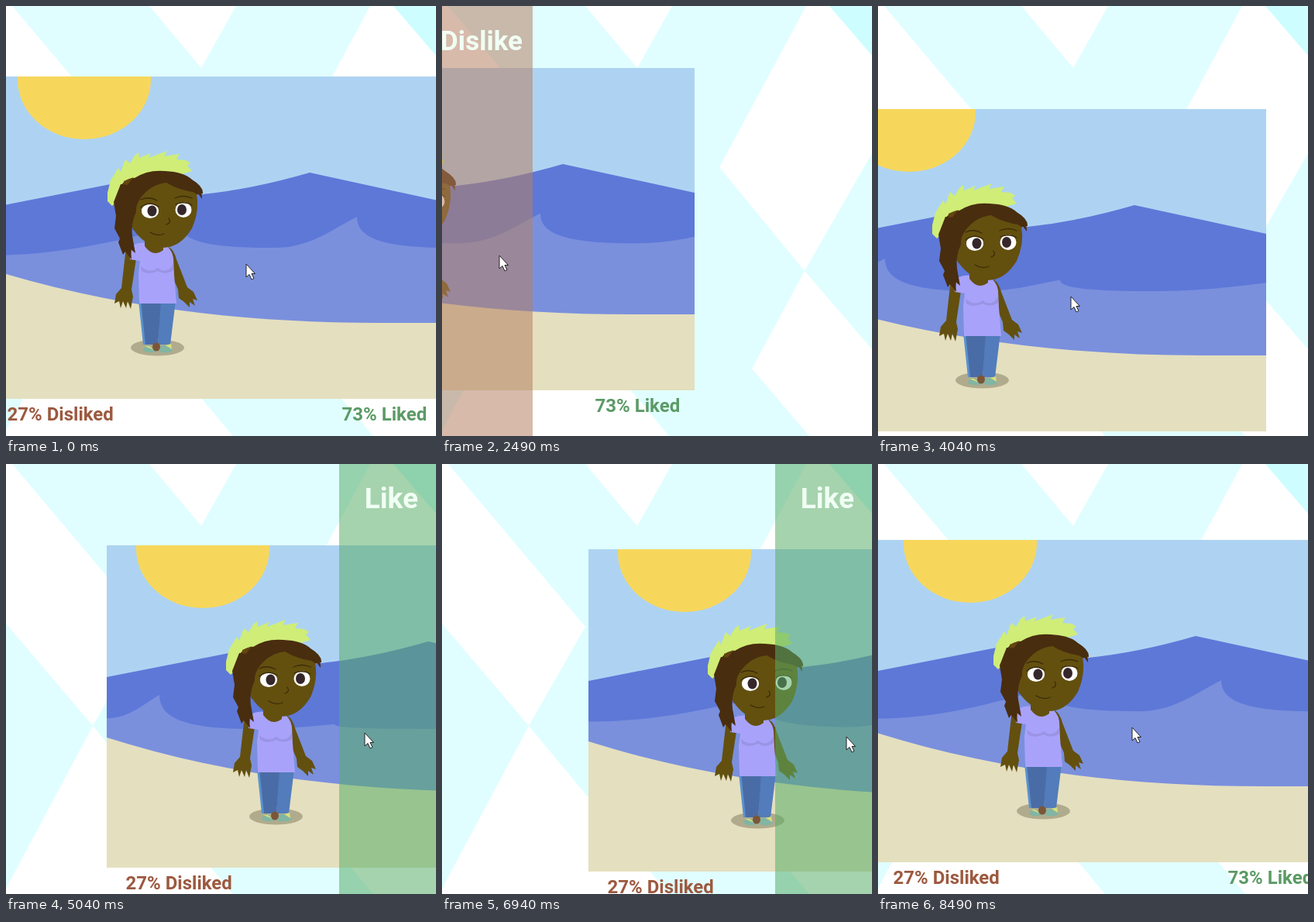
An HTML page that plays this animation: 555x555 px, repeating every 8540 ms.

```html
<!DOCTYPE html>
<html lang="en">
<head>
<meta charset="utf-8">
<title>Swipe card</title>
<style>
html, body { margin: 0; width: 100%; height: 100%; overflow: hidden; background: #fff; }
svg { display: block; width: 555px; height: 555px; }
text { font: 700 24px Roboto, Arial, sans-serif; }
.big { fill: #f1fff4; text-anchor: end; }
.skin { fill: #63500f; }
.hair { fill: #492d0f; }
.line { fill: none; stroke: #3b2b08; stroke-width: 1.3; stroke-linecap: round; }
</style>
</head>
<body>
<svg viewBox="0 0 555 555">
  <defs><clipPath id="frame"><rect x="-23" y="91" width="585" height="416"/></clipPath></defs>

  <g fill="#e0feff">
    <path d="M8 0H185L252 80L297 0H470L358 208L468 342L400 468L474 555H293L112 338L185 210Z"/>
    <path d="M0 206L112 338L0 548Z"/>
    <path d="M468 342L555 190V443Z"/>
    <path d="M500 0H555V64Z" fill="#cdfdff"/>
  </g>

  <g id="card">
    <g clip-path="url(#frame)">
      <path fill="#aed3f2" d="M-23 91H562V507H-23Z"/>
      <ellipse cx="101" cy="95" rx="86" ry="77" fill="#f7d75b"/>
      <path fill="#5e78d8" d="M-23 261L140 229Q185 250 254 243Q320 236 392 215L562 252V450H-23Z"/>
      <path id="wave" fill="#7a90dd"/>
      <path fill="#e4dfbf" d="M-23 339C128 387 300 409 480 409H562V507H-23Z"/>

      <ellipse cx="195.500" cy="441" rx="34.500" ry="10.500" fill="#b1ab8d"/>
      <path fill="#4a6ca6" d="M172 380H202L196 437H178Z"/>
      <path fill="#527cbb" d="M200 380H219L212 437H196Z"/>
      <path fill="#5a92cf" d="M171 380H174L180 437H177Z"/>
      <path fill="#82b5a2" d="M177 445Q178 438 185 438L194 446Q184 449 177 445ZM197 446L200 438H211Q216 443 214 446Q205 449 197 446Z"/>
      <path fill="#d9e07b" d="M179 439H185L191 444ZM206 438L213 436L214 443Z"/>
      <ellipse cx="194" cy="440" rx="5" ry="5.500" fill="#7b5638"/>

      <path class="skin" d="M155 311Q166 306 168 326L162 366L164 375L161 391L157 381L155 390L151 381L148 390L146 381L140 384L142 372L149 364Z"/>
      <path class="skin" d="M210 311Q217 315 220 327L234 363L242 369L247 380L241 378L244 387L237 382L237 389L230 382L223 377L222 366L208 333Z"/>
      <path fill="#a9a2fb" d="M163 309Q172 304 181 306Q190 316 203 308Q214 312 216 325L217 347L220 384H172L171 345L173 329L160 327Z"/>
      <path fill="#9a94e4" d="M174 336Q186 346 196 338Q208 347 216 333L216 341Q205 348 196 342Q184 348 175 342Z"/>
      <path class="skin" d="M179 296H203V315Q190 325 179 310Z"/>

      <path fill="#cfed77" d="M137 258L131 252L131 241L135 225L145 209L148 214L154 198L160 203L166 193L171 189L172 196L187 190L184 196L208 187L204 194L224 191L220 198L232 199L238 203L234 206L240 213L190 228L158 238Z"/>
      <path class="hair" d="M144 242Q150 222 166 222Q183 211 205 213Q229 214 240 224Q255 233 254 242L180 258L165 290Z"/>
      <path fill="#63450f" d="M152 226L165 221Q155 231 152 242Z"/>
      <path class="skin" d="M175 230Q199 218 222 227L246 243Q250 264 240 287Q225 312 202 312Q181 310 167 292Q157 279 160 260Q165 240 175 230Z"/>
      <path class="hair" d="M148 230L170 232Q198 213 236 224Q254 235 253 249L247 241Q223 238 207 228Q188 230 175 246Q167 256 168 266Q161 280 163 297L167 319L161 314L162 327L154 317L151 321L145 305L147 300L140 287L142 271L139 253Z"/>
      <g fill="#fff">
        <ellipse cx="186" cy="264.500" rx="11" ry="9.500"/>
        <ellipse cx="229" cy="263" rx="10.500" ry="10"/>
      </g>
      <g fill="#35272a">
        <ellipse cx="188.500" cy="264.500" rx="6" ry="7"/>
        <ellipse cx="227" cy="263" rx="6" ry="7"/>
      </g>
      <path class="line" d="M174 260Q185 251 197 259M219 256Q230 251 240 257M174 250Q184 245 195 251M218 248Q229 243 240 248"/>
      <path class="line" d="M210 274Q214 280 207 282M186 292Q195 298 204 294"/>
    </g>
    <text x="1.500" y="535" fill="#9c593f">27% Disliked</text>
    <text x="433.500" y="535" fill="#5b9a65">73% Liked</text>
  </g>

  <g id="dislike">
    <path fill="#b58062" fill-opacity=".54" d="M0 0H117V555H0Z"/>
    <text class="big" x="104" y="57" style="font-size:35px">Dislike</text>
  </g>
  <g id="like">
    <path fill="#59ae68" fill-opacity=".54" d="M430 0H555V555H430Z"/>
    <text class="big" x="532" y="57" style="font-size:37px">Like</text>
  </g>
  <path id="cursor" fill="#fff" stroke="#222" d="M310 333V350L314 346.500L317 353L320 351.500L317 345.500H321.500Z"/>
</svg>
<script>
const LOOP = 8540, STEP = 50, LIMIT = 150;
const el = id => document.getElementById(id);

// key points of the hand: time, dx, dy
const hand = [
  [0, 0, 0], [1090, -66, -20], [1790, -190, -28], [2490, -236, -11], [4040, -61, 42], [4490, -15, 37],
  [5040, 153, 14], [5840, 236, 1], [6940, 212, 19], [7190, 143, 18], [8490, 18, 7]
];
// key points of the first wave crest: time, x
const crest = [[0, 227], [1090, 68], [2490, 137], [4040, 70], [5040, 45], [6940, 195], [8490, 199]];

// smooth curve through key points, resting at both ends
function along(keys, t) {
  const last = keys.length - 1;
  const i = Math.max(0, Math.min(last - 1, keys.findLastIndex(k => k[0] <= t)));
  const a = keys[i], b = keys[i + 1], span = b[0] - a[0];
  const p = Math.min(1, (t - a[0]) / span), q = 1 - p;
  const slope = (k, n) => k < 1 || k >= last ? 0 :
    (keys[k + 1][n] - keys[k - 1][n]) / (keys[k + 1][0] - keys[k - 1][0]);
  return a.map((v, n) =>
    v * q * q * (1 + 2 * p) + b[n] * p * p * (3 - 2 * p) +
    span * p * q * (q * slope(i, n) - p * slope(i + 1, n))).slice(1);
}

const rise = (x0, y0, x, y) =>
  `C${x0 + (x - x0) * .45} ${y0} ${x - (x - x0) * .25} ${y + (y0 - y) * .3} ${x} ${y}`;
const fall = (x, y, base) =>
  `C${x} ${y + (base - y) * .7} ${x + 35} ${base} ${x + 120} ${base}`;

function wavePath(t) {
  const [x] = along(crest, t);
  const calm = Math.sin(Math.PI * (t - 700) / LOOP) ** 2;
  const left = 320 + 8 * Math.cos(2 * Math.PI * (t - 1800) / LOOP);
  const trough = 311 + 17 * calm, top = 272 + 50 * calm ** 2;
  const crests = [[x, 284], [x + 226, top], [x + 526, top]];
  let d = `M-23 ${left}`, from = [-23, left];
  for (const [cx, cy] of crests) {
    d += rise(...from, cx, cy) + fall(cx, cy, trough);
    from = [cx + 120, trough];
  }
  return d + 'V450H-23Z';
}

function draw(now) {
  const t = Math.max(0, Math.floor((now % LOOP + 10) / STEP) * STEP - 10);
  const [dx, dy] = along(hand, t);
  const move = `translate(${Math.round(dx)} ${Math.round(dy)})`;
  el('card').setAttribute('transform', move);
  el('cursor').setAttribute('transform', move);
  el('wave').setAttribute('d', wavePath(t));
  el('dislike').style.display = dx < -LIMIT ? '' : 'none';
  el('like').style.display = dx > LIMIT ? '' : 'none';
}

const start = performance.now();
(function tick() {
  draw(performance.now() - start);
  requestAnimationFrame(tick);
})();
</script>
</body>
</html>
```
